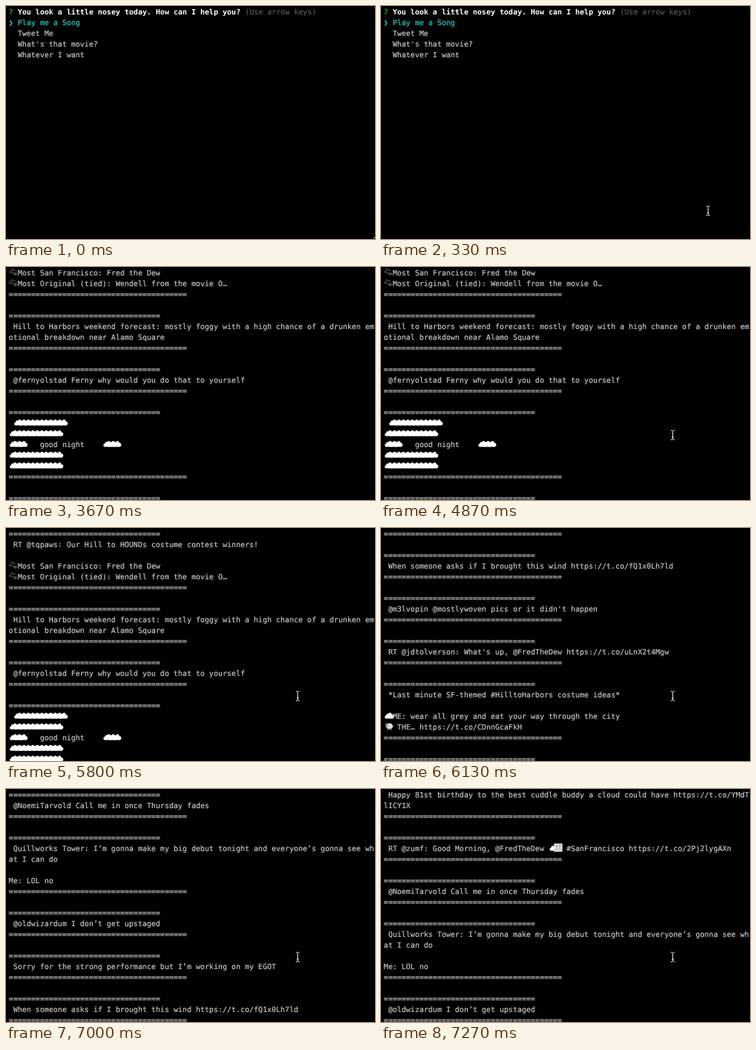
These frames come from a looping animation (480x304 px, 7340 ms). An HTML page:

```html
<!DOCTYPE html>
<html lang="en">
<head>
<meta charset="utf-8">
<title>Terminal menu</title>
<style>
  html, body { margin: 0; width: 100%; height: 100%; overflow: hidden; background: #000; }
  svg { display: block; width: 100%; height: 100%; }
  text {
    font: 9.633px "DejaVu Sans Mono", "Liberation Mono", monospace;
    color: #cbcbcb; fill: currentColor; stroke: currentColor; stroke-width: .15px;
    white-space: pre; text-rendering: geometricPrecision;
  }
  .bold { font-weight: bold; color: #fff; stroke: none; }
  .cyan { color: #2dd0c8; }
  .green { color: #2fbd2a; }
  .dim { color: #5c5c5c; }
</style>
</head>
<body>
<svg id="stage" viewBox="0 0 480 304">
  <defs>
    <g id="cloud">
      <path d="M3.3 10.5C.6 10.5.6 6.8 3 6.7C2.9 4.2 5.5 3.9 6 4.5C7.2 1.8 10.6 2.8 10.4 5.6C13.6 5.4 13.8 10.5 10.9 10.5Z" fill="#fff"/>
      <path d="M2 9.5Q7 10.9 12.4 9.3Q12 10.5 10.9 10.5H3.3Q2.4 10.5 2 9.5Z" fill="#cdcfe2"/>
    </g>
    <g id="paw" fill="#4a4a4a">
      <ellipse cx="8.4" cy="9" rx="2.5" ry="2"/>
      <circle cx="1.9" cy="6.4" r="1.3"/><circle cx="4" cy="3.3" r="1.4"/>
      <circle cx="7.2" cy="4.2" r="1.2"/><circle cx="4.6" cy="7.6" r="1.2"/>
    </g>
    <g id="sheep">
      <ellipse cx="7.4" cy="6.6" rx="4.6" ry="3.8" fill="#dcdcd8"/>
      <path d="M5.1 9.6v2.4M9.6 9.6v2.4" stroke="#8d8a86" stroke-width="1.2"/>
      <ellipse cx="3.8" cy="5.2" rx="1.7" ry="2.2" fill="#8f9490"/>
    </g>
    <g id="fog">
      <rect x="1" y="1.2" width="11" height="10.6" fill="#dfe6ea"/>
      <path d="M1 4.2H12M1 9.2H12" stroke="#a9b8c2"/>
      <path d="M4.6 2.6V8.6M8.6 2.6V8.6" stroke="#8796a0" stroke-width=".8"/>
    </g>
  </defs>
  <g id="menu"></g>
  <g id="feed"></g>
  <path id="pointer" d="M-2.5-6Q0-6 0-4.5Q0-6 2.5-6M0-4.5V5M-2.5 6.5Q0 6.5 0 5Q0 6.5 2.5 6.5M-1.5 3H1.5" fill="none" stroke="#d8d8d8"/>
</svg>
<script>
const LOOP = 7340, LEFT = 3.6, CELL = 5.8, ROW = 14, BASELINE = 11;
const ICONS = { '☁': 'cloud', '🐾': 'paw', '🐑': 'sheep', '🌁': 'fog' };
const [menu, feed, pointer] = ['menu', 'feed', 'pointer'].map(id => document.getElementById(id));

function add(parent, tag, attributes, content = '') {
  const node = document.createElementNS('http://www.w3.org/2000/svg', tag);
  for (const name in attributes) node.setAttribute(name, attributes[name]);
  node.textContent = content;
  parent.append(node);
}

function print(parent, row, col, content, style = '') {
  add(parent, 'text', { x: LEFT + col * CELL, y: row * ROW + BASELINE, class: style }, content);
}

// Prints a line, swapping icon characters for drawings in their cells.
function printLine(parent, row, line) {
  const cells = [...line].map((char, col) => {
    if (!ICONS[char]) return char;
    add(parent, 'use', { href: '#' + ICONS[char], x: LEFT + col * CELL, y: row * ROW });
    return ' ';
  }).join('');
  const content = cells.trim();
  if (content) print(parent, row, cells.length - cells.trimStart().length, content);
}

const QUESTION = 'You look a little nosey today. How can I help you?';
const OPTIONS = ['Play me a Song', 'Tweet Me', "What's that movie?", 'Whatever I want'];

function drawMenu({ selected, hint, answered }) {
  menu.replaceChildren();
  print(menu, 0, 0, '?', 'green');
  print(menu, 0, 2, QUESTION, 'bold');
  const end = QUESTION.length + 3;
  if (hint) print(menu, 0, end, '(Use arrow keys)', 'dim');
  if (answered) return print(menu, 0, end, OPTIONS[selected], 'cyan');
  OPTIONS.forEach((option, i) => print(menu, i + 1, 2, option, i === selected ? 'cyan' : ''));
  print(menu, selected + 1, 0, '❯', 'cyan');
}

const bank = '☁'.repeat(11), puff = '☁☁☁', gap = '    ';
const POSTS = [
  [' Happy 81st birthday to the best cuddle buddy a cloud could have https://t.co/YMdT', 'lICY1X'],
  [' RT @zumf: Good Morning, @FredTheDew ☁🌁  #SanFrancisco https://t.co/2Pj2lygAXn'],
  [' @NoemiTarvold Call me in once Thursday fades'],
  [' Quillworks Tower: I’m gonna make my big debut tonight and everyone’s gonna see wh', 'at I can do', '', 'Me: LOL no'],
  [' @oldwizardum I don’t get upstaged'],
  [' Sorry for the strong performance but I’m working on my EGOT'],
  [' When someone asks if I brought this wind https://t.co/fQ1x0Lh7ld'],
  [" @m3lvopin @mostlywoven pics or it didn't happen"],
  [" RT @jdtolverson: What's up, @FredTheDew https://t.co/uLnX2t4Mgw"],
  [' *Last minute SF-themed #HilltoHarbors costume ideas*', '', '☁ ME: wear all grey and eat your way through the city', '🐑  THE… https://t.co/CDnnGcaFkH'],
  [' RT @tqpaws: Our Hill to HOUNDs costume contest winners!', '', '🐾 Most San Francisco: Fred the Dew', '🐾 Most Original (tied): Wendell from the movie O…'],
  [' Hill to Harbors weekend forecast: mostly foggy with a high chance of a drunken em', 'otional breakdown near Alamo Square'],
  [' @fernyolstad Ferny why would you do that to yourself'],
  [' ' + bank, bank, puff + gap + 'good night' + gap + puff, bank, bank],
  []
];
POSTS.flatMap(lines => ['='.repeat(34), ...lines, '='.repeat(40), ''])
  .forEach((line, row) => printLine(feed, row, line));

// Each timeline entry is [start in ms, value] and holds until the next.
const MENU = [
  [0, { selected: 0, hint: true }],
  [2800, { selected: 1 }],
  [3330, { selected: 1, answered: true }],
  [3670, null]
];
const POINTER = [
  [0, [480.5, 308]], [70, [465, 296]], [130, [446, 282]], [200, [432, 272]], [330, [425.5, 267]],
  [2200, [418.5, 260]], [2730, null],
  [4730, [401.5, 231]], [4800, [388.5, 225]], [4870, [379.5, 219]]
];
const SCROLL = [
  [0, null], [3670, 50],
  [5800, 47], [5870, 43], [5930, 39], [6000, 34], [6070, 30], [6130, 26], [6200, 23], [6270, 22], [6330, 21],
  [6670, 20], [6800, 18], [6870, 15], [6930, 12], [7000, 9], [7070, 6], [7130, 4], [7200, 2], [7270, 1]
];
const valueAt = (timeline, time) => timeline.findLast(([start]) => start <= time)[1];
const show = (node, visible) => node.setAttribute('display', visible ? 'inline' : 'none');

let shownMenu;
function render(now) {
  const time = now % LOOP;
  const state = valueAt(MENU, time), top = valueAt(SCROLL, time), spot = valueAt(POINTER, time);
  if (state && state !== shownMenu) drawMenu(shownMenu = state);
  show(menu, state);
  show(feed, top !== null);
  feed.setAttribute('transform', `translate(0 ${-ROW * top})`);
  show(pointer, spot);
  if (spot) pointer.setAttribute('transform', `translate(${spot})`);
}

const begin = performance.now();
function tick() {
  render(performance.now() - begin);
  requestAnimationFrame(tick);
}
tick();
</script>
</body>
</html>
```
